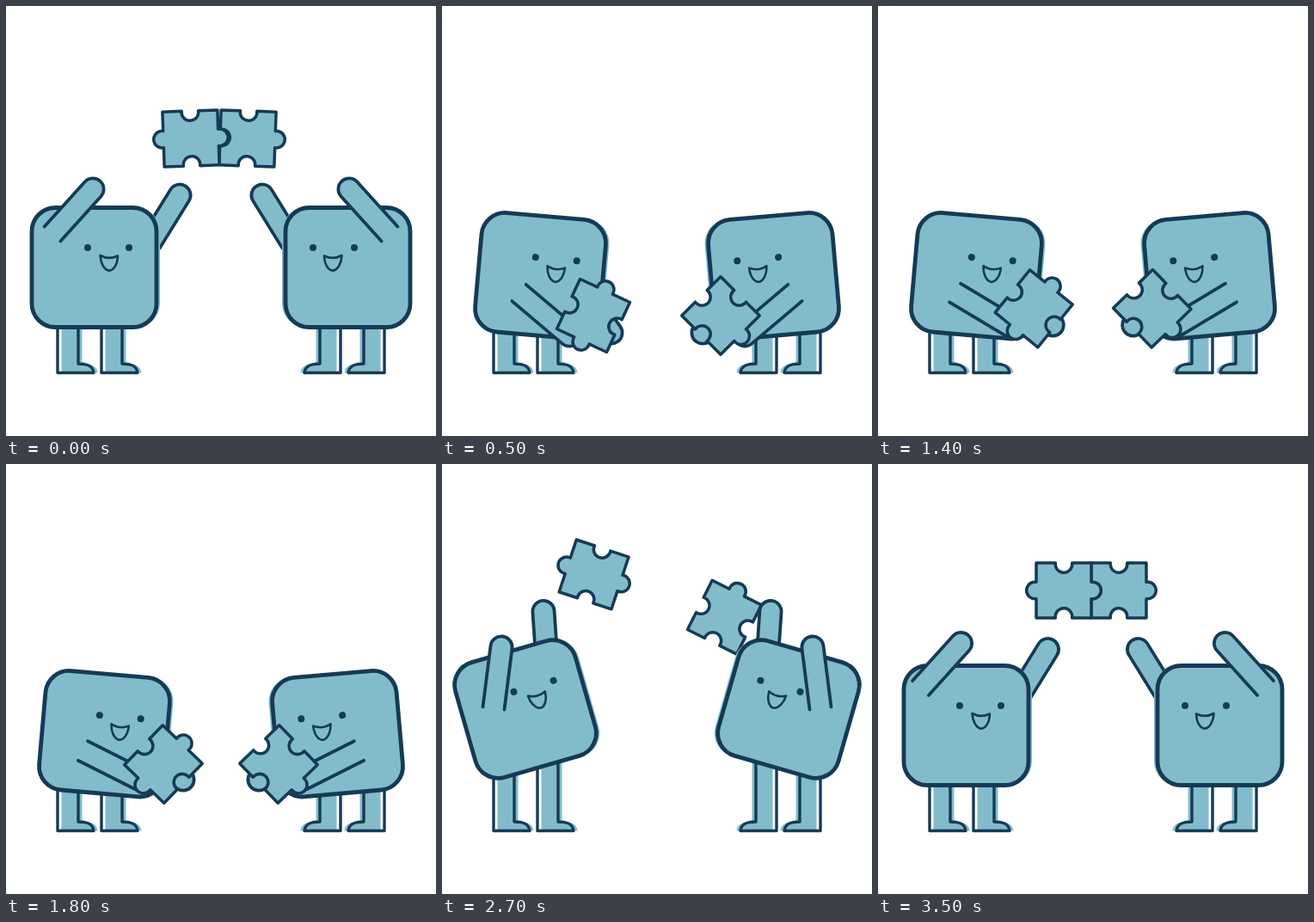
Animation, 500 px wide and 500 px high, one loop 3.7 s. Source, as an HTML page with a canvas:

```html
<!DOCTYPE html>
<html lang="en">
<head>
<meta charset="utf-8">
<title>Puzzle friends</title>
<style>
html, body { margin: 0; width: 100%; height: 100%; overflow: hidden; background: #fff; }
canvas { display: block; width: 500px; height: 500px; }
</style>
</head>
<body>
<canvas id="stage"></canvas>
<script>
const LOOP = 3700, STEP = 100, LAST = 3500, SIZE = 500;
const FILL = '#82bccb', LINE = '#153a56';
const canvas = document.getElementById('stage');
const ctx = canvas.getContext('2d');
const dpr = window.devicePixelRatio || 1;
canvas.width = canvas.height = SIZE * dpr;

// Sides run top, right, bottom, left: 1 is a tab, -1 a notch
const LEFT = { sides: [-1, 1, -1, 1], seat: 216, caught: -65, delay: 0 };
const RIGHT = { sides: [-1, -1, -1, 1], seat: 220, caught: -45, delay: 100 };

const span = (t, a, b) => Math.min(1, Math.max(0, (t - a) / (b - a)));
const smooth = k => k * k * (3 - 2 * k);
const ease = (t, a, b) => smooth(span(t, a, b));
const mix = (a, b, k) => a + (b - a) * k;
const blend = (p, q, k) => p.map((v, i) => mix(v, q[i], k));

// Pose: body x, y, tilt | front arm base, hand | back arm base, hand | face drop
const reach = up => [
  102.5, 304, 0,
  54 - up, 265 - up, 101 - up, 213 - up,
  168 - up, 275 - up, 202 - up, 220 - up, 0
];

const hold = (lift, crouch) => [
  114.5, 313.7 - 5 * crouch, 5,
  89.5, 333.5 - 11 * crouch, 148 + 8 * (lift - crouch), 383 - 16 * lift - 2 * crouch,
  165, 335, 197 + 9 * lift - 7 * crouch, 380 - 13 * lift + 5 * crouch, 2
];

const THROW = [97, 285, -16, 60, 284, 69, 213, 122, 230, 118, 171.5, 0];

function poseAt(t) {
  const held = hold(span(t, 500, 1800), ease(t, 2150, 2400));
  const bent = blend(reach(0), held, ease(t, 0, 400));
  const thrown = blend(bent, THROW, ease(t, 2400, 2680));
  return blend(thrown, reach(4.5), ease(t, 2780, 3080));
}

// The pair drops, is caught, lifted, dipped, tossed with a spin and joins again
function pieceAt(t, { seat, caught, delay }) {
  const drop = ease(t, 0, 400);
  const lift = span(t, 500, 1800) ** 0.8;
  const dip = ease(t, 2200 + delay, 2450 + delay);
  const top = 2890 + delay;
  const toss = span(t, 2450 + delay, top);
  const drift = ease(t, 2450 + delay, 3150 + delay);

  let x = mix(seat - 1, 176, drop) + 7 * lift - 6 * dip;
  x = mix(x, seat, drift) - 12 * Math.sin(Math.PI * toss);
  let y = mix(154, 360, drop) - 11 * lift + 25 * dip;
  y = mix(y, 112, 1 - (1 - toss) ** 3.3) + 35 * span(t, top, LAST) ** 1.4;
  const turn = mix(mix(mix(-2, caught, drop), -46, lift), 360, smooth(toss));
  return [x, y, turn];
}

function placed(x, y, deg, draw) {
  ctx.save();
  ctx.translate(x, y);
  ctx.rotate(deg * Math.PI / 180);
  draw();
  ctx.restore();
}

function outline(width) {
  ctx.lineWidth = width;
  ctx.stroke();
}

function piece([x, y, deg], sides) {
  const h = 32, r = 9.8, off = 1.5, a = Math.asin(off / r);
  placed(x, y, deg, () => {
    ctx.beginPath();
    for (const s of sides) {
      ctx.lineTo(-h, -h);
      ctx.arc(0, -h - s * off, r, Math.PI - s * a, s * a, s < 0);
      ctx.lineTo(h, -h);
      ctx.rotate(Math.PI / 2);
    }
    ctx.closePath();
    ctx.fill();
    outline(3.5);
  });
}

function arm(bx, by, hx, hy) {
  const r = 12.6, dir = Math.atan2(hy - by, hx - bx);
  const nx = -Math.sin(dir) * r, ny = Math.cos(dir) * r;
  ctx.beginPath();
  ctx.moveTo(bx - nx, by - ny);
  ctx.arc(hx, hy, r, dir - Math.PI / 2, dir + Math.PI / 2);
  ctx.lineTo(bx + nx, by + ny);
  ctx.fill();
  outline(3.8);
}

function legPath(x) {
  ctx.beginPath();
  ctx.moveTo(x, 342);
  ctx.lineTo(x, 426.5);
  ctx.lineTo(x + 42, 426.5);
  ctx.bezierCurveTo(x + 41, 418, x + 34, 416, x + 24, 416);
  ctx.lineTo(x + 24, 342);
}

function leg(x) {
  legPath(x + 4.5);
  ctx.fill();
  legPath(x);
  outline(3.4);
}

function bodyPath() {
  ctx.beginPath();
  ctx.roundRect(-72.5, -69.5, 145, 139, 27.5);
}

function face() {
  for (const x of [-7.5, 40.5]) {
    ctx.beginPath();
    ctx.arc(x, -23, 4, 0, 7);
    ctx.fillStyle = LINE;
    ctx.fill();
  }
  ctx.beginPath();
  ctx.moveTo(7, -14);
  ctx.quadraticCurveTo(17, -8.5, 27.5, -13.5);
  ctx.bezierCurveTo(27, -1, 21, 4.5, 16.5, 3.5);
  ctx.bezierCurveTo(11.5, 2, 7.5, -5, 7, -14);
  ctx.closePath();
  outline(2.6);
  ctx.fillStyle = FILL;
}

function friend(t, kind) {
  const pose = poseAt(t), [x, y, tilt] = pose;
  const part = pieceAt(t, kind);
  const flying = t < 300 || t >= 2600;

  if (flying) piece(part, kind.sides);
  arm(...pose.slice(7, 11));
  leg(60);
  leg(111);
  placed(x + 4, y, tilt, () => { bodyPath(); ctx.fill(); });
  placed(x, y, tilt, () => {
    bodyPath();
    ctx.fill();
    outline(4.8);
    ctx.translate(0, pose[11]);
    face();
  });
  arm(...pose.slice(3, 7));
  if (!flying) piece(part, kind.sides);
}

function render(t) {
  ctx.setTransform(dpr, 0, 0, dpr, 0, 0);
  ctx.fillStyle = '#fff';
  ctx.fillRect(0, 0, SIZE, SIZE);
  ctx.fillStyle = FILL;
  ctx.strokeStyle = LINE;
  ctx.lineCap = ctx.lineJoin = 'round';

  ctx.save();
  ctx.translate(SIZE, 0);
  ctx.scale(-1, 1);
  friend(t, RIGHT);
  ctx.restore();
  friend(t, LEFT);
}

function tick() {
  const t = performance.now() % LOOP;
  render(Math.min(LAST, Math.floor(t / STEP) * STEP));
  requestAnimationFrame(tick);
}
tick();
</script>
</body>
</html>
```
